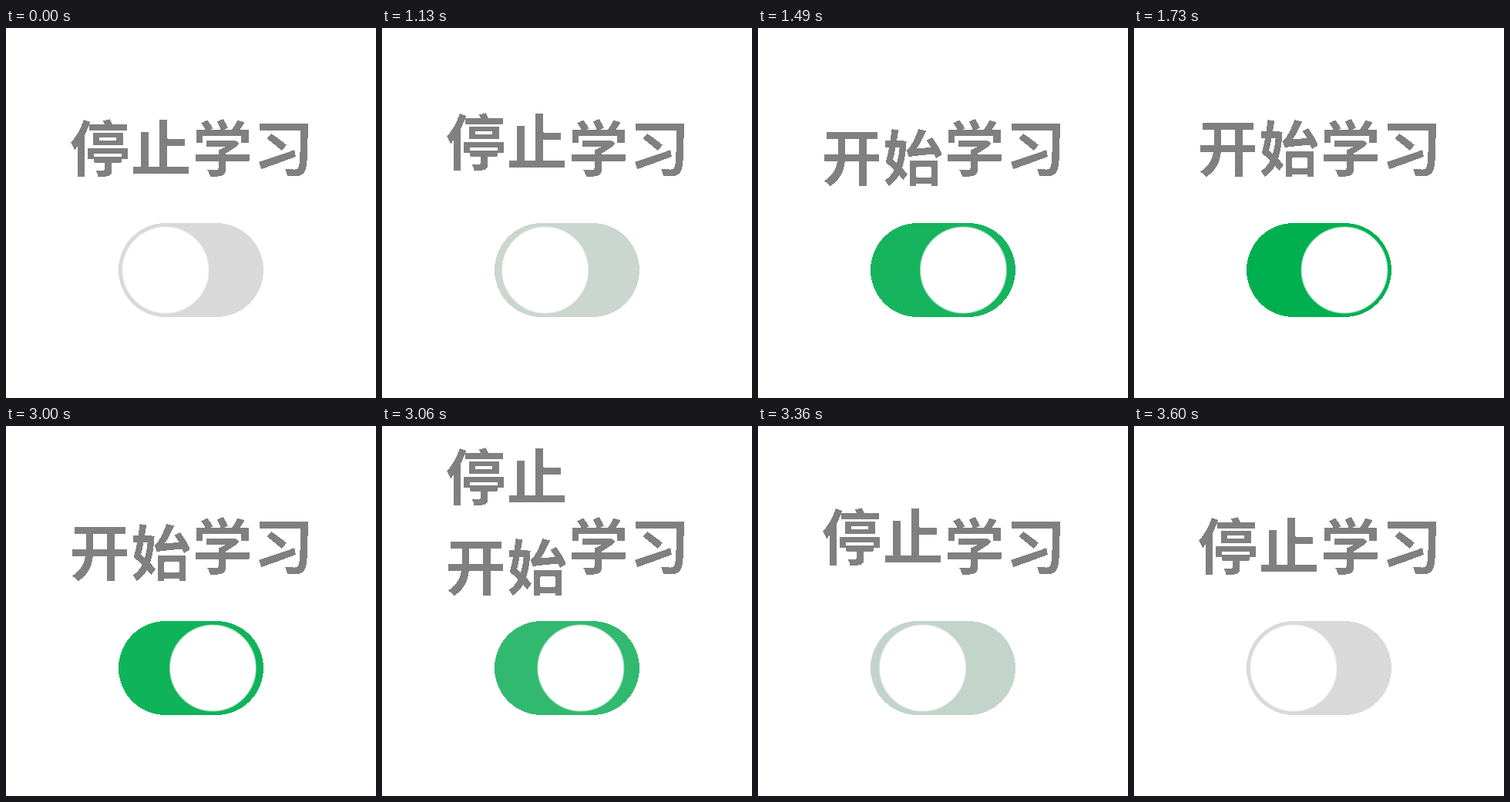
Write an HTML page that moves like this. It is 480x480 px and loops after 3.8 s.

```html
<!DOCTYPE html>
<html lang="zh-CN">
<head>
<meta charset="utf-8">
<title>学习开关</title>
<style>
  html, body { margin: 0; width: 100%; height: 100%; overflow: hidden; background: #fff; }
  svg { display: block; width: 100vw; height: 100vh; }
  text {
    font: 700 78px "Noto Sans CJK SC", "Noto Sans CJK", sans-serif;
    letter-spacing: 1.5px;
    fill: #808080;
  }
</style>
</head>
<body>
<svg viewBox="0 0 480 480">
  <filter id="crisp" filterUnits="userSpaceOnUse" x="0" y="0" width="480" height="480"
          color-interpolation-filters="sRGB">
    <feComponentTransfer><feFuncA type="discrete" tableValues="0 1"/></feComponentTransfer>
  </filter>
  <g filter="url(#crisp)">
    <text id="stop" x="82.5" y="186">停止</text>
    <text id="start" x="82.5" y="186">开始</text>
    <text x="241.5" y="186">学</text>
    <text x="321" y="186">习</text>
  </g>
  <rect id="track" x="146" y="253" width="188" height="122" rx="61" shape-rendering="crispEdges"/>
  <circle id="knob" cx="207" cy="314" r="55.5" fill="#fff" stroke="#fff" stroke-width="2" stroke-opacity=".5"/>
</svg>
<script>
  const LOOP = 3800, STEP = 60, TURN_ON = 1130, TURN_OFF = 3000;
  const EASE = [0, .07, .23, .41, .575, .71, .815, .9, .95, .98, .995, 1];
  const OFF = [217, 217, 217], ON = [0, 176, 80];
  const BASELINE = 186, TRAVEL = 117, MIN_SHARE = .15;
  const [stop, start, track, knob] =
    ['stop', 'start', 'track', 'knob'].map(id => document.getElementById(id));

  // Eased progress, held for each step
  function progress(t, from) {
    const step = Math.floor((t - from) / STEP) + 1;
    return EASE[Math.max(0, Math.min(step, EASE.length - 1))];
  }

  // A word shows only once its share of the transition is large enough
  function placeWord(word, y, share) {
    word.setAttribute('y', BASELINE + Math.round(y));
    word.setAttribute('visibility', share > MIN_SHARE ? 'visible' : 'hidden');
  }

  function draw(t) {
    const on = progress(t, TURN_ON) - progress(t, TURN_OFF);
    placeWord(stop, -TRAVEL * on, 1 - on);
    placeWord(start, TRAVEL * (1 - on), on);
    knob.setAttribute('cx', 207 + 66 * on);
    track.setAttribute('fill', `rgb(${OFF.map((c, i) => Math.round(c + (ON[i] - c) * on))})`);
  }

  const begin = performance.now();
  function tick() {
    draw((performance.now() - begin) % LOOP);
    requestAnimationFrame(tick);
  }
  tick();
</script>
</body>
</html>
```
